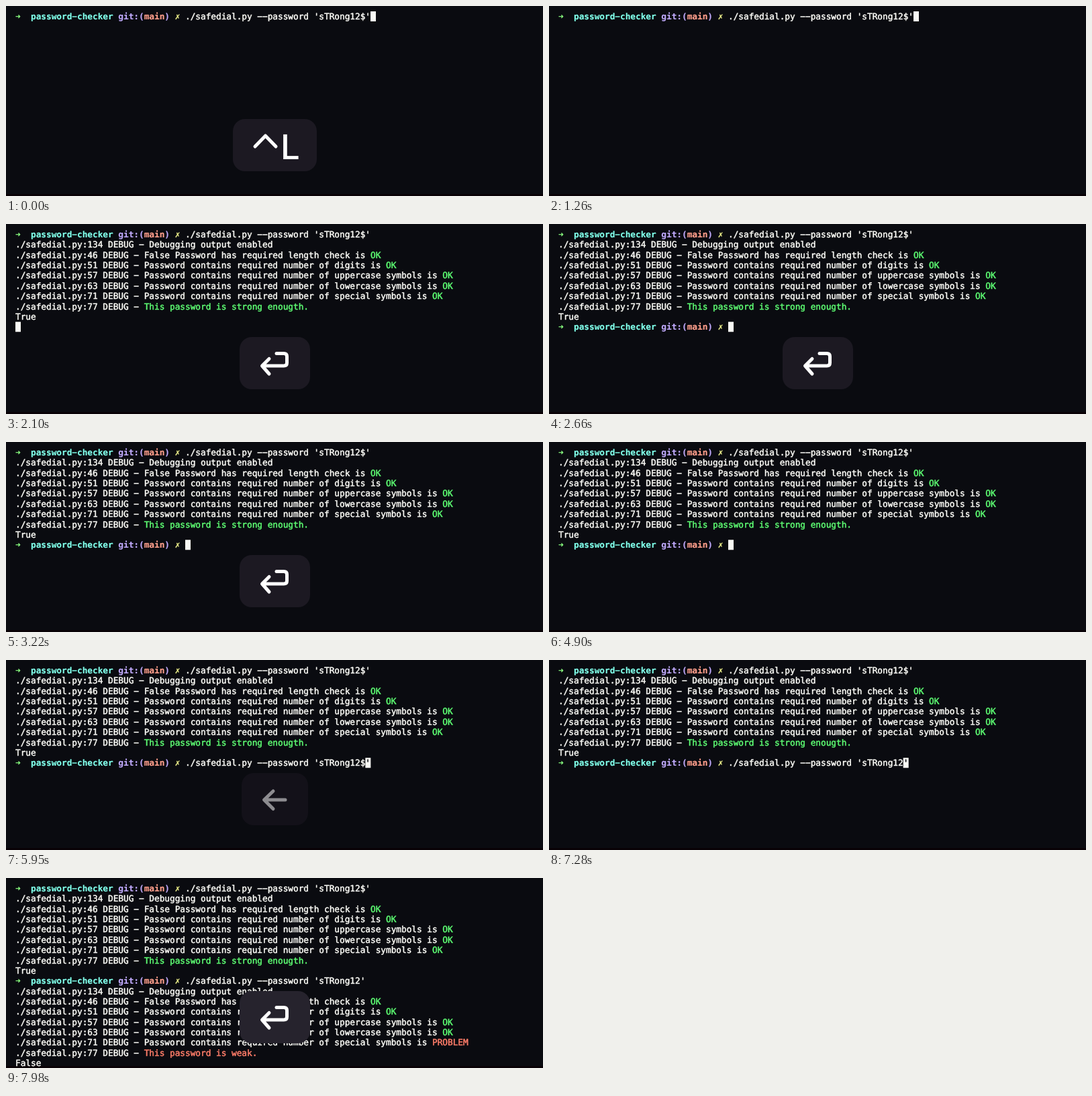
An HTML page with a canvas for the animation above (8000 ms loop, 800 px wide and 284 px high).

```html
<!DOCTYPE html>
<html lang="en">
<head>
<meta charset="utf-8">
<title>Password checker terminal</title>
<style>
  html, body { margin: 0; width: 100%; height: 100%; overflow: hidden; background: #0a0b10; }
  canvas { display: block; }
</style>
</head>
<body>
<canvas id="stage" width="800" height="284"></canvas>
<script>
const ctx = document.getElementById('stage').getContext('2d');
const LOOP = 8000, FADE = 210;
const LEFT = 14, COL = 7.667, ROW = 15.36;
const COLORS = {
  back: '#0a0b10', text: '#fafaf5', cyan: '#80ffea', lavender: '#bfa9fa',
  salmon: '#ff9f8c', lime: '#8aff80', yellow: '#f6f98f', ok: '#5dfb72', bad: '#ff7d69'
};

// Times in ms at which the session changes
const T = {
  enter: 1890, output: 1960, prompt: 2240, up: 5110, left: 5320,
  remove: 7070, enterAgain: 7560, outputAgain: 7630
};

const KEYS = [
  { name: 'ctrlL', from: 0, fade: 840, width: 125 },
  { name: 'enter', from: T.enter, fade: 3640, width: 105 },
  { name: 'up', from: T.up, fade: T.left, until: T.left, width: 92 },
  { name: 'left', from: T.left, fade: 5850, width: 99 },
  { name: 'enter', from: T.enterAgain, fade: LOOP, width: 105, fill: '#26232d' }
];

const GLYPHS = {
  ctrlL: 'M371 210L386.5 194L402 210',
  enter: 'M403 193.500H414Q418.500 193.500 418.500 198V207.500Q418.500 212 414 212H382M392 201.500L381.500 212L392 224',
  up: 'M400 226V194M387 207L400 194L413 207',
  left: 'M385 209H416M398 196L384.500 209L398 222.500'
};

ctx.textRendering = 'geometricPrecision';
ctx.lineCap = ctx.lineJoin = 'round';

function write(row, col, text, color = 'text', bold = false) {
  ctx.font = `${bold ? 'bold ' : ''}12.8px "DejaVu Sans Mono", monospace`;
  ctx.fillStyle = ctx.strokeStyle = COLORS[color];
  ctx.lineWidth = bold ? 0.15 : 0.5;
  // The terminal's hyphen is as wide as a minus sign
  [...text.replaceAll('-', '\u2212')].forEach((char, i) => {
    const x = LEFT + (col + i) * COL, y = 20 + row * ROW;
    ctx.fillText(char, x, y);
    ctx.strokeText(char, x, y);
  });
}

function cursor(row, col, char = '') {
  ctx.fillStyle = COLORS.text;
  ctx.fillRect(LEFT + col * COL, 8 + row * ROW, 8, 15);
  write(row, col, char, 'back');
}

function prompt(row, command = '') {
  write(row, 0, '➜', 'lime', true);
  write(row, 3, 'password-checker', 'cyan', true);
  write(row, 20, 'git:(', 'lavender', true);
  write(row, 25, 'main', 'salmon', true);
  write(row, 29, ')', 'lavender', true);
  write(row, 31, '✗', 'yellow', true);
  write(row, 33, command);
}

function debug(row, line, message, result = '', color = 'ok') {
  const start = `./safedial.py:${line} DEBUG - ${message}`;
  write(row, 0, start);
  write(row, start.length, result, color);
}

function report(row, strong) {
  const contains = kind => `Password contains required number of ${kind} is `;
  const color = strong ? 'ok' : 'bad';
  debug(row, 134, 'Debugging output enabled');
  debug(row + 1, 46, 'False Password has required length check is ', 'OK');
  debug(row + 2, 51, contains('digits'), 'OK');
  debug(row + 3, 57, contains('uppercase symbols'), 'OK');
  debug(row + 4, 63, contains('lowercase symbols'), 'OK');
  debug(row + 5, 71, contains('special symbols'), strong ? 'OK' : 'PROBLEM', color);
  debug(row + 6, 77, '', `This password is ${strong ? 'strong enougth' : 'weak'}.`, color);
  write(row + 7, 0, strong ? 'True' : 'False');
}

function drawKey(key, t) {
  const end = key.until ?? key.fade + FADE;
  if (t < key.from || t >= end) return;
  ctx.globalAlpha = Math.min(1, 1 - (t - key.fade) / FADE);
  ctx.fillStyle = key.fill ?? '#1c1922';
  ctx.beginPath();
  ctx.roundRect(400.5 - key.width / 2, 169, key.width, 78, 18);
  ctx.fill();
  ctx.strokeStyle = ctx.fillStyle = '#fff';
  ctx.lineWidth = 5;
  ctx.stroke(new Path2D(GLYPHS[key.name]));
  if (key.name === 'ctrlL') {
    ctx.font = '500 51px Inter, sans-serif';
    ctx.fillText('L', 409, 229);
  }
  ctx.globalAlpha = 1;
}

function drawTerminal(t) {
  const command = "./safedial.py --password 'sTRong12";
  const end = 33 + command.length;
  prompt(0, command + "$'");
  if (t < T.enter) return cursor(0, end + 2);
  if (t < T.output) return cursor(1, 0);
  report(1, true);
  if (t < T.prompt) return cursor(9, 0);

  const typed = t < T.up ? '' : command + (t < T.remove ? "$'" : "'");
  prompt(9, typed);
  if (t >= T.outputAgain) report(10, false);
  else if (t >= T.enterAgain) cursor(10, 0);
  else if (t >= T.left) cursor(9, 32 + typed.length, "'");
  else cursor(9, 33 + typed.length);
}

function draw(t) {
  ctx.fillStyle = COLORS.back;
  ctx.fillRect(0, 0, 800, 284);
  ctx.fillStyle = '#090206';
  ctx.fillRect(0, 281, 800, 3);
  drawTerminal(t);
  KEYS.forEach(key => drawKey(key, t));
}

const start = performance.now();
function tick() {
  draw((performance.now() - start) % LOOP);
  requestAnimationFrame(tick);
}
tick();
</script>
</body>
</html>
```
